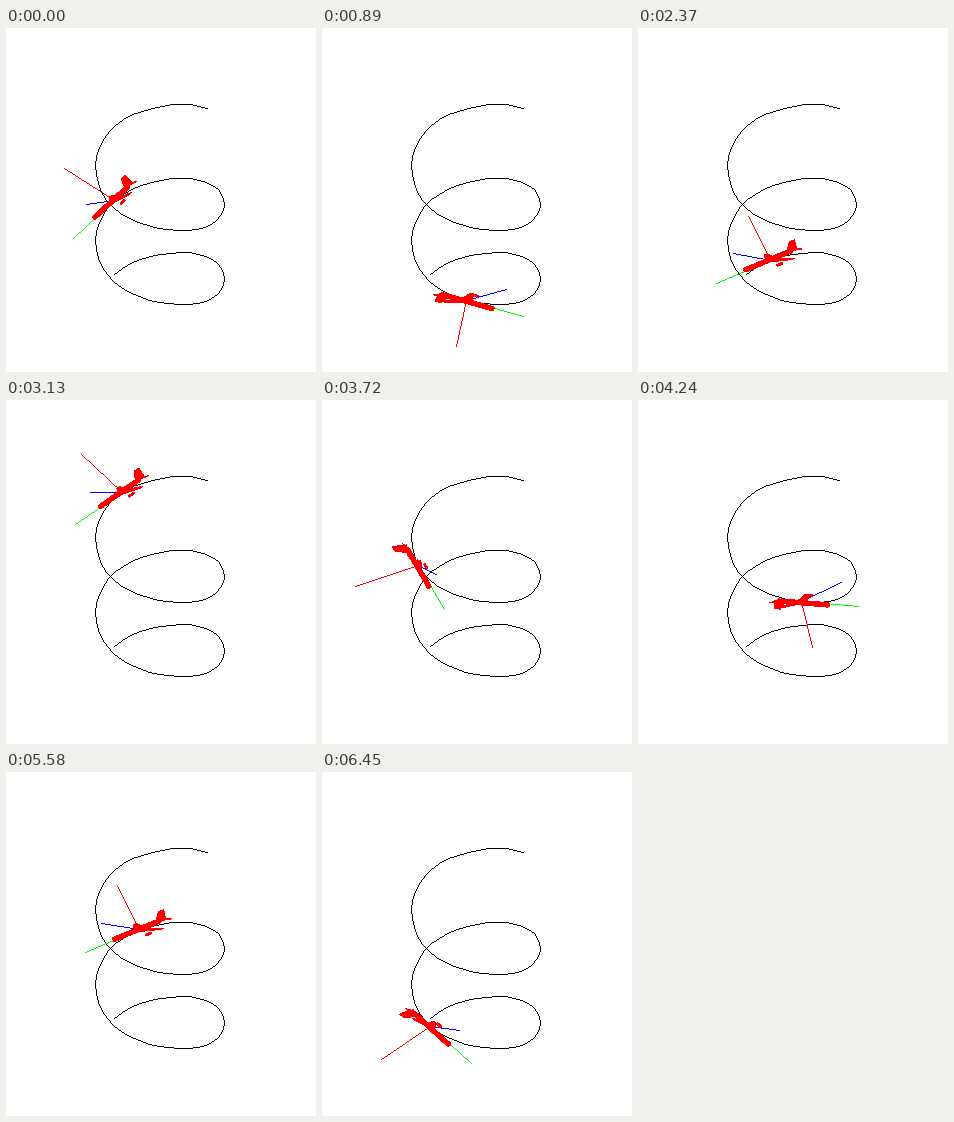
Write an HTML page that moves like this. It is 310 px wide and 344 px high and loops after 6550 ms.

```html
<!DOCTYPE html>
<html lang="en">
<head>
<meta charset="utf-8">
<title>Plane on a helix</title>
<style>
  html, body { margin: 0; width: 100%; height: 100%; overflow: hidden; background: #fff; }
  svg { display: block; width: 310px; height: 344px; }
  path { shape-rendering: crispEdges; }
  .plane { fill: none; stroke: #f00; stroke-linecap: round; stroke-linejoin: round; }
  .plane .solid { fill: #f00; }
</style>
</head>
<body>
<svg viewBox="0 0 310 344" xmlns="http://www.w3.org/2000/svg">
  <path id="helix" fill="#000"/>
  <path id="forward" fill="#0f0"/>
  <path id="side" fill="#00f"/>
  <path id="up" fill="#f00"/>
  <g class="plane" transform="translate(.5 .5)">
    <path id="body" stroke-width="5.5"/>
    <path id="engines" stroke-width="3"/>
    <path id="surfaces" class="solid" stroke-width="1"/>
  </g>
</svg>
<script>
const LOOP = 6550, STEP_TIME = 64.3, STEPS = 90, FIRST_STEP = 50;
const START_ANGLE = .75, STEP_ANGLE = 4.51 * Math.PI / STEPS;
const AXIS = 70;
const { sin, cos, PI, round, abs, max } = Math;

// Aircraft parts as [forward, side, up] in axis lengths
const body = [[-.36, 0, .02], [.45, 0, .02]];
const fin = [[-.3, 0, .02], [-.42, 0, .2], [-.52, 0, .2], [-.48, 0, .02]];
const wing = s => [[.09, 0, 0], [-.13, .36 * s, 0], [-.19, .36 * s, 0], [-.09, 0, 0]];
const stabilizer = s => [[-.38, 0, .02], [-.48, .12 * s, .02], [-.5, .12 * s, .02], [-.46, 0, .02]];
const engine = s => [[.04, .2 * s, -.06], [-.04, .2 * s, -.06]];
const bothSides = part => [part(1), part(-1)];

const setPath = (id, d) => document.getElementById(id).setAttribute("d", d);
const outline = points => "M" + points.map(p => p.map(v => v.toFixed(2)).join(" ")).join("L");

// One-pixel line without antialiasing
function pixelLine(points) {
  const grid = points.map(p => p.map(round));
  const pixels = new Set();
  grid.slice(1).forEach(([x1, y1], i) => {
    const [x0, y0] = grid[i], n = max(abs(x1 - x0), abs(y1 - y0), 1);
    for (let k = 0; k <= n; k++)
      pixels.add(`M${round(x0 + (x1 - x0) * k / n)} ${round(y0 + (y1 - y0) * k / n)}h1v1h-1z`);
  });
  return [...pixels].join("");
}

const angleAt = step => START_ANGLE + step * STEP_ANGLE;

function helixPoint(a) {
  return [153.5 + 64.5 * cos(a), 102 + 37 * a / PI - 43.6 * sin(a) - 1.1 * sin(3 * a)];
}

const project = (x, y, z) => [AXIS * x, AXIS * (-.66 * y - .26 * z)];

function render(t) {
  const step = (FIRST_STEP + Math.floor(t / STEP_TIME + .5)) % STEPS;
  const a = angleAt(step + .15);
  const s = sin(a), c = cos(a), origin = helixPoint(a);
  const axes = [
    project(-.82 * s, .82 * c, -.57),
    project(-.57 * s, .57 * c, .82),
    project(c, s, 0)
  ];
  const place = p => origin.map((o, i) => o + axes.reduce((sum, axis, j) => sum + axis[i] * p[j], 0));
  const shapes = parts => parts.map(part => outline(part.map(place))).join("");

  ["forward", "side", "up"].forEach((id, i) =>
    setPath(id, pixelLine([origin, origin.map((o, k) => o + axes[i][k])])));
  setPath("body", shapes([body]));
  setPath("engines", shapes(bothSides(engine)));
  setPath("surfaces", shapes([fin, ...bothSides(wing), ...bothSides(stabilizer)]));
}

setPath("helix", pixelLine(Array.from({ length: STEPS + 1 }, (_, i) => helixPoint(angleAt(i)))));

const start = performance.now();
function tick() {
  render((performance.now() - start) % LOOP);
  requestAnimationFrame(tick);
}
tick();
</script>
</body>
</html>
```
